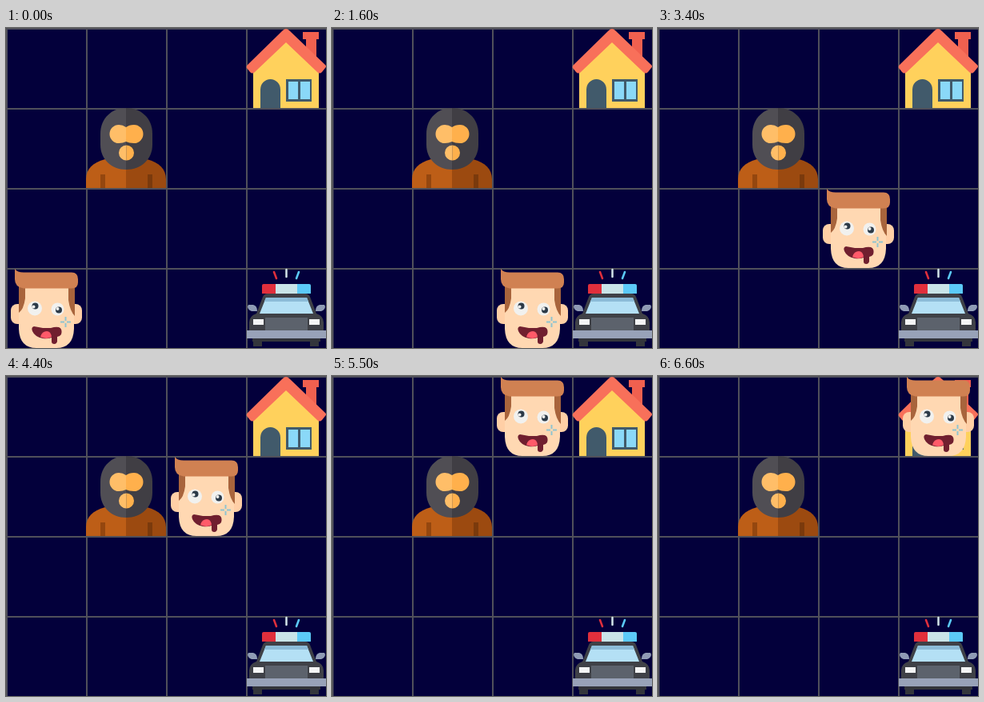
Write an HTML page that moves like this. It is 400x400 px and loops after 6700 ms.

```html
<!DOCTYPE html>
<html lang="en">
<head>
<meta charset="utf-8">
<title>Grid walk</title>
<style>
  html, body { margin: 0; width: 100%; height: 100%; overflow: hidden; background: #03003b; }
  svg { display: block; width: 100vw; height: 100vh; }
</style>
</head>
<body>
<svg viewBox="0 0 400 400">
  <rect width="400" height="400" fill="#03003b"/>
  <path stroke="#50505a" stroke-width="2" d="M0 1H400M0 101H400M0 201H400M0 301H400M1 0V400M101 0V400M201 0V400M301 0V400"/>

  <g id="house" transform="translate(300 0)">
    <path fill="#f0604f" d="M71 5H91V14H88V40H75V14H71Z"/>
    <path fill="#ffd15c" d="M9 54L50 16L91 54V100H9Z"/>
    <path fill="#f8705a" d="M46 3Q50 -1 54 3L99 46Q101 48 99 50L95 55Q92 58 89 55L50 18L11 55Q8 58 5 55L1 50Q0 48 2 46Z"/>
    <path fill="#415a6b" d="M18 100V77A12.5 13 0 0 1 43 77V100ZM50 64H82V92H50Z"/>
    <path fill="#8ad8f8" d="M53 67H65V89H53ZM68 67H80V89H68Z"/>
  </g>

  <g id="robber" transform="translate(100 100)">
    <path fill="#bd5e17" d="M0 100V89C0 77 8 68 24 64H50V100Z"/>
    <path fill="#9c4a10" d="M50 64H76C92 68 100 77 100 89V100H50Z"/>
    <path fill="#94470f" d="M18 83H24V100H18Z"/>
    <path fill="#7a3a0c" d="M77 83H83V100H77Z"/>
    <path fill="#504e54" d="M50 0C32 0 18 13 18 32V46C18 64 32 77 50 77Z"/>
    <path fill="#403e44" d="M50 0C69 0 83 13 83 32V46C83 64 69 77 50 77Z"/>
    <path fill="#ffbe68" d="M50 24Q46 21 41 21A11.5 11.5 0 0 0 41 44Q46 44 50 42ZM50.500 46.500A9.5 9.5 0 0 0 50.500 65.500Z"/>
    <path fill="#ffb04c" d="M50 24Q54 21 60 21A11.5 11.5 0 0 1 60 44Q54 44 50 42ZM50.500 46.500A9.5 9.5 0 0 1 50.500 65.500Z"/>
  </g>

  <g id="car" transform="translate(300 300)">
    <g fill="none" stroke-width="2.5" stroke-linecap="round">
      <path stroke="#e02f3c" d="M35 5L38 13"/>
      <path stroke="#d4e6ea" d="M50.5 2V11"/>
      <path stroke="#5ccaf8" d="M66 5L63 13"/>
    </g>
    <path fill="#e02f3c" d="M22 20H37V32H20V22Q20 20 22 20Z"/>
    <path fill="#c9e4e8" d="M37 20H64V32H37Z"/>
    <path fill="#5ccaf8" d="M64 20H79Q81 20 81 22V32H64Z"/>
    <path fill="#8f9bb5" d="M3 46H9Q14 47 14 54H7Q2 52 2 48ZM98 46H92Q87 47 87 54H94Q99 52 99 48Z"/>
    <path fill="#33353b" d="M8 86H93V92H91V98H80V92H20V98H9V92H8Z"/>
    <path fill="#3f4147" d="M27 32H74Q78 32 80 36L88 57Q97 60 97 68V80H4V68Q4 60 13 57L21 36Q23 32 27 32Z"/>
    <path fill="#b4e0f5" d="M25 37H76L84 57H17Z"/>
    <path fill="#8cbcd8" d="M25 37H76L78 42H23Z"/>
    <path fill="#5c626c" d="M24 62H77V79H24Z"/>
    <path fill="#f4f5f5" d="M9 64H22V71H9ZM79 64H92V71H79Z"/>
    <path fill="#98a2b8" d="M1 78H100V88H1Z"/>
  </g>

  <g id="face">
    <rect x="6" y="45" width="18" height="25" rx="8" fill="#ffcfa6"/>
    <rect x="77" y="45" width="18" height="25" rx="8" fill="#ffcfa6"/>
    <path fill="#ffd8b2" d="M16 20H85V76Q84 100 63 100H38Q17 100 16 76Z"/>
    <path fill="#a8643c" d="M16 20H24V38Q22 52 16 56ZM78 20H86V60Q80 54 78 40Z"/>
    <path fill="#d08152" d="M11 1Q14 5.500 22 5.500H82Q90 5.500 90 14V18Q90 25.500 82 25.500H22Q11 24 11 14Z"/>
    <g fill="#f1f1ef">
      <circle cx="36" cy="50.5" r="9"/>
      <circle cx="64.5" cy="51.5" r="8"/>
    </g>
    <g fill="#2c3a48">
      <circle cx="36.5" cy="47.5" r="4"/>
      <circle cx="66" cy="52.5" r="4"/>
    </g>
    <g fill="#f1f1ef">
      <circle cx="34.5" cy="48.5" r="2"/>
      <circle cx="64.5" cy="51" r="2"/>
    </g>
    <path fill="#701f2f" d="M35 73Q41 74 46 75H56Q62 73 66 74Q71 76 69 83Q67 86 64 86V92Q63 95 60.500 95Q57 95 57 92V87Q52 89 46 88Q36 86 33 79Q31 74 35 73Z"/>
    <path fill="#ff5a69" d="M43 86Q45 79 51 79Q56 79 57 86Q51 90 43 86Z"/>
    <path fill="none" stroke="#8fc4d0" stroke-width="2" d="M74.500 61V66M74.500 69V74M68 67.500H73M76 67.500H81"/>
  </g>
</svg>
<script>
  const LOOP = 6700, FIRST = 500, STEP = 1100;
  const route = [[0, 3], [1, 3], [2, 3], [2, 2], [2, 1], [2, 0], [3, 0]];
  const face = document.getElementById('face');
  const start = performance.now();

  function draw(now) {
    const t = Math.max(0, now - start) % LOOP;
    const step = t < FIRST ? 0 : 1 + Math.floor((t - FIRST) / STEP);
    const [col, row] = route[Math.min(step, route.length - 1)];
    face.setAttribute('transform', `translate(${col * 100} ${row * 100})`);
    requestAnimationFrame(draw);
  }
  draw(start);
</script>
</body>
</html>
```
